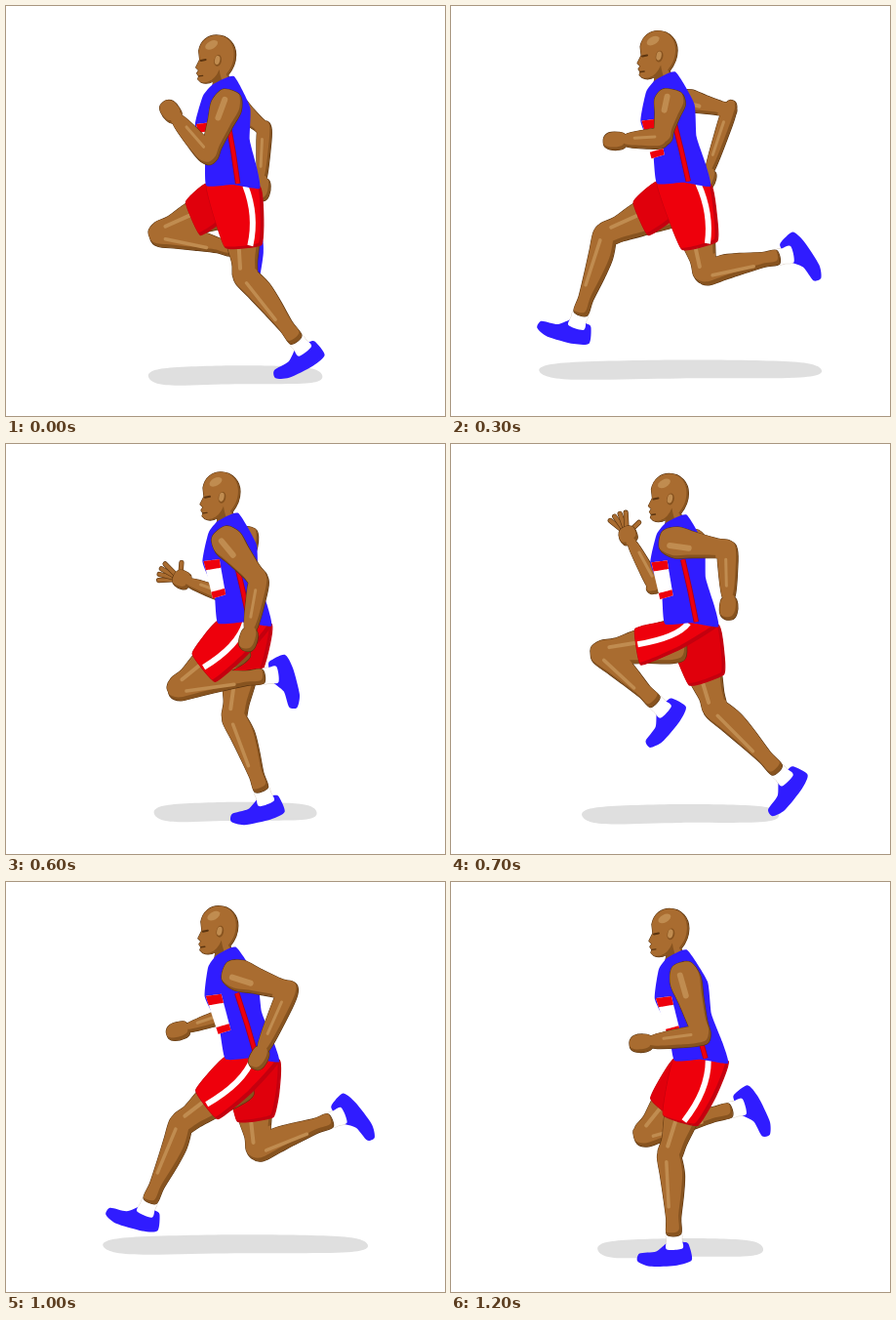
Recreate the animation shown at these times as an HTML page with a canvas. Size 450 by 420 pixels, loop 1300 ms.

```html
<!DOCTYPE html>
<html lang="en">
<head>
<meta charset="utf-8">
<title>Runner</title>
<style>
  html, body { margin: 0; width: 100%; height: 100%; overflow: hidden; background: #fff; }
  canvas { display: block; }
</style>
</head>
<body>
<canvas id="stage" width="450" height="420"></canvas>
<script>
const ctx = document.getElementById('stage').getContext('2d');
const STEP = 100, COUNT = 13, STRIDE = COUNT / 2;
const BLUE = '#301cff', RED = '#ee000c', DARK_RED = '#c4000e', WHITE = '#fff';
const SKIN = '#a96c30', SHADE = '#87531f', LIGHT = '#c08c50', LINE = '#5c3510';

// Key points of one cycle, shared by both sides half a cycle apart.
// [phase, knee x, y, ankle x, y, foot angle]
const LEG = [
  [0, 252, 276, 304, 342, 141],
  [1, 283, 266, 352, 324, 92],
  [2.5, 272, 272, 346, 272, 52],
  [4, 244, 272, 318, 236, 40],
  [6, 178, 250, 264, 238, 63],
  [7.25, 151, 209, 196, 271, 130],
  [8.75, 146, 217, 138, 298, 175],
  [10.25, 183, 254, 150, 332, 183],
  [12, 219, 280, 223, 361, 165]
];
// [phase, elbow x, y, wrist x, y]
const ARM = [
  [0, 214, 153, 182, 116],
  [1, 209, 138, 189, 97],
  [4, 229, 136, 187, 160],
  [6, 260, 140, 251, 190],
  [7.25, 286, 104, 287, 153],
  [10, 286, 112, 260, 171],
  [12, 251, 157, 200, 164]
];

// Resting outlines; the shirt starts at the throat and runs down the front
const SHIRT = [[211, 80], [202, 92], [198, 122], [212, 152], [218, 184], [245, 183], [273, 187], [267, 165], [256, 137], [252, 104], [231, 72]];
const BIB = [[199, 121], [215, 119], [224, 155], [211, 159]];
const SEAM = [[231, 118], [241, 150], [250, 182]];
const SHOE = [[10, -3], [-4, 0], [-9, 3], [-8, 17], [8, 18], [35, 13], [46, 6], [42, 0], [25, 2]];

// Rows of [position along bone, front half width, back half width]
const THIGH = [[0, 20, 20], [.5, 18, 17], [.82, 13, 13], [1, 13, 12], [1.13, 7, 7]];
const SHIN = [[-.12, 7, 7], [0, 13, 11], [.25, 11, 14], [.5, 9, 12], [.8, 7, 8], [1, 7, 7]];
const UPPER = [[-.22, 9, 9], [.05, 16, 16], [.4, 13, 13], [.8, 10, 10], [1, 10, 10], [1.15, 5, 5]];
const FORE = [[-.15, 5, 5], [0, 10, 10], [.35, 10, 10], [1, 6, 6]];
const FIST = [[0, 6, 6], [.3, 9, 9], [.75, 9, 8], [1, 4, 4]];

const mix = (a, b, t) => a.map((v, i) => v + (b[i] - v) * t);
const along = (a, d, l) => [a[0] + d[0] * l, a[1] + d[1] * l];
const front = d => [-d[1], d[0]];
const wave = (i, peak, period) => Math.cos(2 * Math.PI * (i - peak) / period);

function unit(a, b) {
  const l = Math.hypot(b[0] - a[0], b[1] - a[1]) || 1;
  return [(b[0] - a[0]) / l, (b[1] - a[1]) / l];
}

// Periodic cubic curve through key rows
function track(keys, phase) {
  const p = phase % COUNT, n = keys.length;
  const row = k => {
    const [t, ...v] = keys[(k + n) % n];
    return [t + COUNT * Math.floor(k / n), ...v];
  };
  let j = n - 1;
  while (keys[j][0] > p) j--;
  const [a, b, c, d] = [row(j - 1), row(j), row(j + 1), row(j + 2)];
  const span = c[0] - b[0], t = (p - b[0]) / span, s = t * t * (3 - 2 * t);
  return b.map((v, i) => {
    const m = (c[i] - a[i]) / (c[0] - a[0]) * span;
    const k = (d[i] - v) / (d[0] - b[0]) * span;
    return v + (c[i] - v) * s + m * t * (1 - t) ** 2 - k * t * t * (1 - t);
  }).slice(1);
}

// Closed smooth curve
function blob(pts, k = .08, path = new Path2D()) {
  const n = pts.length, at = j => pts[(j + n) % n];
  path.moveTo(...pts[0]);
  for (let j = 0; j < n; j++) {
    const [o, a, b, c] = [at(j - 1), at(j), at(j + 1), at(j + 2)];
    path.bezierCurveTo(a[0] + k * (b[0] - o[0]), a[1] + k * (b[1] - o[1]),
      b[0] - k * (c[0] - a[0]), b[1] - k * (c[1] - a[1]), ...b);
  }
  path.closePath();
  return path;
}

function bone(a, b, profile, path, scale = 1) {
  const n = front(unit(a, b));
  const side = (t, w) => along(mix(a, b, t), n, w * scale);
  return blob([...profile.map(r => side(r[0], r[1])), ...profile.map(r => side(r[0], -r[2])).reverse()], .15, path);
}

function paint(path, color) {
  ctx.fillStyle = color;
  ctx.fill(path);
}

function shaded(path, base, dark, dx, dy, edge) {
  ctx.lineWidth = 1.2;
  ctx.strokeStyle = edge;
  ctx.stroke(path);
  paint(path, dark);
  ctx.save();
  ctx.clip(path);
  ctx.translate(dx, dy);
  paint(path, base);
  ctx.restore();
}

function line(a, b, color, width) {
  ctx.strokeStyle = color;
  ctx.lineWidth = width;
  ctx.beginPath();
  ctx.moveTo(...a);
  ctx.lineTo(...b);
  ctx.stroke();
}

function oval(x, y, rx, ry, turn, color) {
  ctx.fillStyle = color;
  ctx.beginPath();
  ctx.ellipse(x, y, rx, ry, turn, 0, 7);
  ctx.fill();
}

function shine(a, b, from, to, off, width) {
  const n = front(unit(a, b));
  line(along(mix(a, b, from), n, off), along(mix(a, b, to), n, off), LIGHT, width);
}

// Curved stripe through three points
function band([a, m, b], color, width) {
  ctx.strokeStyle = color;
  ctx.lineWidth = width;
  ctx.lineCap = 'butt';
  ctx.beginPath();
  ctx.moveTo(...a);
  ctx.quadraticCurveTo(2 * m[0] - (a[0] + b[0]) / 2, 2 * m[1] - (a[1] + b[1]) / 2, ...b);
  ctx.stroke();
  ctx.lineCap = 'round';
}

function leg(phase, drift, waist, near) {
  const [kx, ky, ax, ay, angle] = track(LEG, phase);
  const swing = kx - 215;
  const hip = [243 + .12 * swing + drift, 201], knee = [kx + drift, ky], ankle = [ax + drift, ay];

  // The foot turns about the ankle
  const top = along(ankle, unit(knee, ankle), 10);
  const r = angle * Math.PI / 180, toe = [Math.cos(r), Math.sin(r)], sole = [toe[1], -toe[0]];
  const sock = bone(ankle, top, [[-.1, 7, 7], [.6, 8, 8], [1.5, 8, 8]]);
  ctx.lineWidth = .7;
  ctx.strokeStyle = '#c9b8a6';
  ctx.stroke(sock);
  paint(blob(SHOE.map(([u, v]) => along(along(top, toe, u - 5), sole, v * 1.2)), .12), BLUE);
  paint(sock, WHITE);

  const path = bone(hip, knee, THIGH);
  bone(knee, ankle, SHIN, path);
  shaded(path, SKIN, SHADE, -2.5, -3.5, LINE);
  shine(hip, knee, .55, .9, 5, 4);
  shine(knee, ankle, .08, .65, 4, 3.5);

  // Shorts hang from the waist and end square to the thigh
  const d = unit(hip, knee), n = front(d), hem = along(hip, d, near ? 45 : 42);
  const back = along(hem, n, -18), seat = along(mix(back, waist[1], .5), [1, 1], 3);
  shaded(blob([waist[0], along(hem, n, 19), back, seat, waist[1]], .06),
    near ? RED : '#e0000c', DARK_RED, -3, -2, DARK_RED);
  if (near) {
    const from = mix(waist[0], waist[1], .62 + swing * .003);
    const to = along(hem, n, -3 - swing * .1);
    band([from, along(mix(from, to, .45), [1, .6], 5), to], WHITE, 6);
  }
}

function arm(phase, drift, shoulder, scale, open) {
  const [ex, ey, wx, wy] = track(ARM, phase);
  const elbow = [ex + drift, ey], wrist = [wx + drift, wy], d = unit(elbow, wrist);
  if (open) {
    const palm = along(wrist, d, 10), base = Math.atan2(d[1], d[0]);
    for (const turn of [-.4, -.12, .16, .44, 1.3]) {
      const tip = along(palm, [Math.cos(base + turn), Math.sin(base + turn)], turn > 1 ? 17 : 22);
      line(palm, tip, LINE, 5.2);
      line(palm, tip, SKIN, 4);
    }
  }
  const path = bone(shoulder, elbow, UPPER, undefined, scale);
  bone(elbow, wrist, FORE, path, scale);
  bone(wrist, along(wrist, d, open ? 17 : 22), FIST, path);
  shaded(path, SKIN, SHADE, -2, -3, LINE);
  shine(shoulder, elbow, -.05, .3, 4 * scale, 6 * scale);
  shine(elbow, wrist, .2, .75, 2, 3);
}

const FACE = new Path2D('M195 46C197 35 205 30 213 30C226 30 233 40 233 50C233 60 229 66 225 71L230 80Q219 89 208 90L210 77Q203 81 197 78L194 75L195 72L193 69L195 66L192 63L196 55Z');
const JAW = new Path2D('M204 78Q212 75 216 65Q217 74 222 84Q215 89 208 90L210 77Z');

function head(x, y) {
  ctx.save();
  ctx.translate(x, y);
  shaded(FACE, SKIN, SHADE, -2, -1, LINE);
  paint(JAW, SHADE);
  oval(208, 40, 7, 4, -.5, LIGHT);
  line([197, 56], [202, 55], LINE, 2);
  line([195, 72], [199, 71.5], LINE, 1.4);
  oval(214.5, 56, 3.8, 6, .2, SHADE);
  oval(214, 55.5, 2.6, 4.6, .2, LIGHT);
  ctx.restore();
}

function draw(i) {
  const drift = i - COUNT / 2;               // slides right, then jumps back
  const flight = wave(i, 3.9, STRIDE);       // 1 in mid-air, -1 on the ground
  const headX = 5.5 - 4.5 * flight + drift, bob = -2.5 - 3 * flight;
  const twist = 4 * wave(i, -1, COUNT);

  // The chest follows the head, the hem follows the hips
  const bend = pts => pts.map(([x, y]) => {
    const low = (y - 72) / 115;
    return [x + headX + (2 * drift - headX) * low, y + bob * (1 - low * .5)];
  });
  const shirt = bend(SHIRT), waist = [shirt[4], shirt[6]].map(([x, y]) => [x, y - 2]);

  ctx.fillStyle = WHITE;
  ctx.fillRect(0, 0, 450, 420);
  ctx.lineCap = ctx.lineJoin = 'round';

  const half = 115 + 32 * wave(i, 2.6, STRIDE), ground = 375 - 4 * flight;
  const pool = [[-1, 1], [-.82, -7], [0, -10], [.8, -8], [1, 0], [.85, 8], [0, 9], [-.8, 10]];
  paint(blob(pool.map(([u, v]) => [235 + half * u, ground + v]), .16), '#dfdfdf');

  arm(i + STRIDE, drift, [244 + drift - twist, 101 + bob], .72, i > 5 && i < 9);
  leg(i + STRIDE, drift, waist, false);
  leg(i, drift, waist, true);
  head(headX, bob);

  paint(blob(shirt), BLUE);
  const [a, b, c, d] = bend(BIB);
  const strip = (from, to, color) =>
    paint(blob([mix(a, d, from), mix(b, c, from), mix(b, c, to), mix(a, d, to)], 0), color);
  strip(0, 1, WHITE);
  strip(0, .24, RED);
  strip(.83, 1, RED);
  const seam = bend(SEAM);
  band(seam, '#a8001c', 5.5);
  band(seam, RED, 3.8);
  arm(i, drift, [230 + drift + twist, 100 + bob], 1, false);
}

const start = performance.now();
let shown = -1;
function tick() {
  const i = Math.floor((performance.now() - start) / STEP) % COUNT;
  if (i !== shown) draw(shown = i);
  requestAnimationFrame(tick);
}
tick();
</script>
</body>
</html>
```
